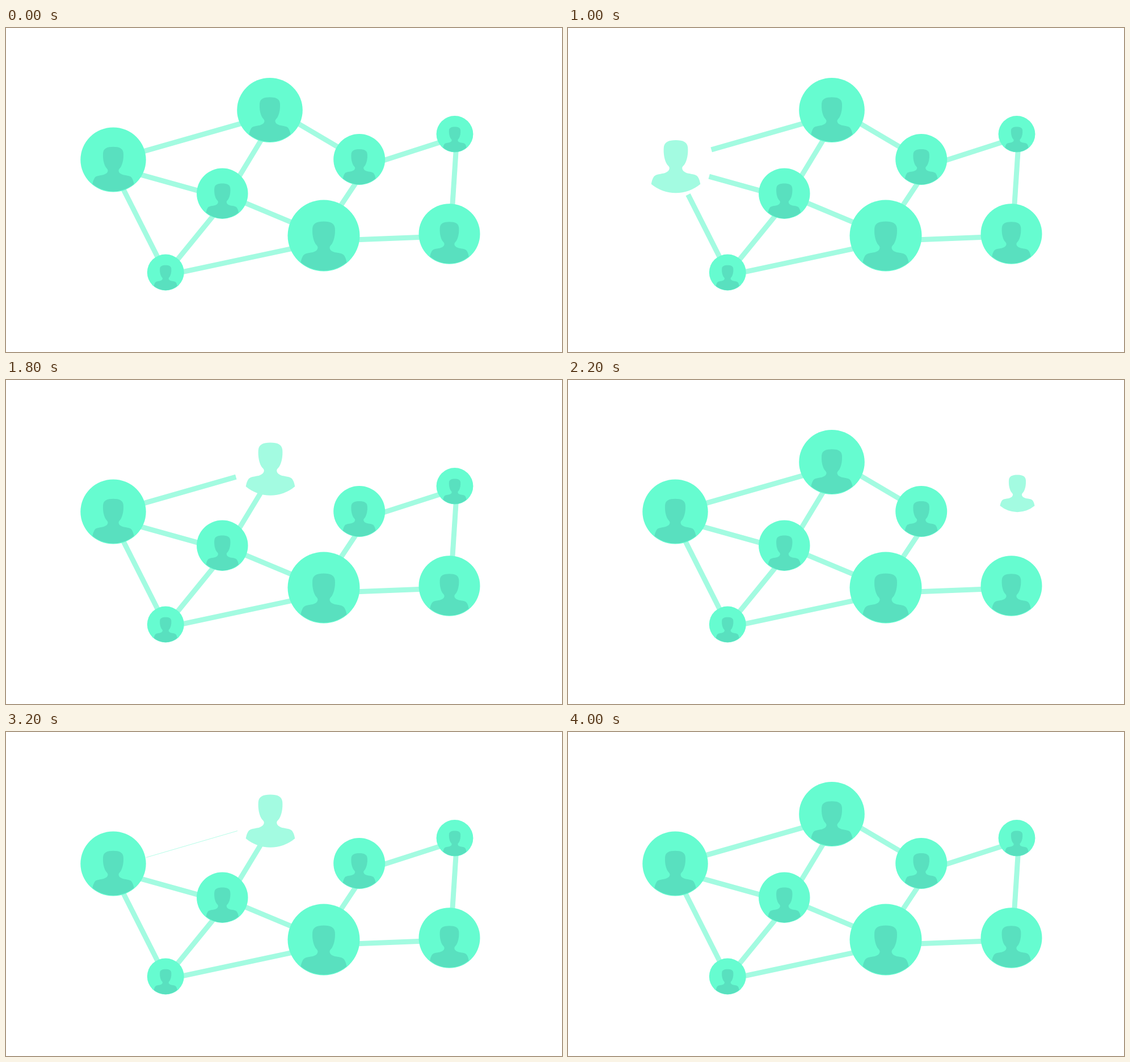
These frames come from a looping animation (980 by 572 pixels, 4100 ms). An HTML page with a canvas:

```html
<!DOCTYPE html>
<html lang="en">
<head>
<meta charset="utf-8">
<title>Network</title>
<style>
  html, body { margin: 0; width: 980px; height: 572px; overflow: hidden; background: #fff; }
  canvas { display: block; }
</style>
</head>
<body>
<canvas id="stage" width="980" height="572"></canvas>
<script>
const ctx = document.getElementById('stage').getContext('2d');
const DISC = '#66fcd0', BUST = '#59e0bf', PALE = '#a3fbe1';
const LOOP = 4100, STEP = 100, PAD = 5;

// Head is 100 units wide; the origin is the middle of its top edge.
const bust = new Path2D(
  'M0 0C30 0 47 8 49 30C51 55 46 82 36 98C30 106 26 108 26 114C26 124 34 131 48 135' +
  'C70 139 84 140 90 150C96 160 98 168 100 179A156 156 0 0 1 -100 179' +
  'C-98 168 -96 160 -90 150C-84 140 -70 139 -48 135C-34 131 -26 124 -26 114' +
  'C-26 108 -30 106 -36 98C-46 82 -51 55 -49 30C-47 8 -30 0 0 0Z');

// disc: x, y, rx, ry; pale: x, top, scale of the bare figure
const nodes = {
  A: { disc: [189, 232.5, 57.7, 57], pale: [190, 198, 0.433] },
  B: { disc: [465, 145, 57.8, 57], pale: [466, 110.5, 0.433] },
  C: { disc: [381.3, 292.3, 45.2, 44.7], pale: [383, 263, 0.365] },
  D: { disc: [281.3, 431.5, 32.5, 32], pale: [287, 405, 0.305] },
  E: { disc: [622.7, 232, 45.5, 45], pale: [629, 210, 0.365] },
  F: { disc: [560, 366.5, 63.5, 63], pale: [561, 339, 0.461] },
  G: { disc: [791, 187.2, 32.4, 32.2], pale: [792, 167.5, 0.305] },
  H: { disc: [781.5, 363.5, 54, 53.3], pale: [783.5, 338, 0.4] }
};

const links = {
  AB: [245, 217, 413, 169], AC: [241, 260, 338, 287], AD: [208, 287, 267, 404],
  BC: [449, 199, 411, 262], BE: [517, 170, 585, 210], CD: [364, 333, 303, 408],
  CF: [422, 309, 503, 343], DF: [314, 430, 502, 390], EG: [668, 233, 764, 202],
  EF: [615, 276, 591, 312], GH: [793, 219, 787, 311], FH: [623, 373.5, 729, 369.5]
};

// cut: link -> [start, end] trim in px, or 0 for a missing link
const looks = {
  A: { off: 'A', cut: { AB: [8, -PAD], AC: [8, -PAD], AD: [8, -PAD] } },
  A2: { off: 'A', cut: { AB: 0, AC: [8, -PAD], AD: [8, -PAD] } },
  B: { off: 'B', cut: { AB: [-PAD, 8], BE: 0 } },
  B2: { off: 'B', cut: { AB: 0, BE: 0 }, sliver: [247, 221.5, 408, 174.5] },
  C: { off: 'C', cut: { CD: 0, AC: [-PAD, 8], BC: [-PAD, 8], CF: [8, -PAD] } },
  D: { off: 'D', cut: { AD: 0, CD: 0, DF: [20, -PAD] }, sliver: [217, 292, 262, 384] },
  E: { off: 'E', cut: { EG: 0, EF: 0, BE: [-PAD, 8] } },
  G: { off: 'G', cut: { EG: 0, GH: 0 } },
  H: { off: 'H', cut: { GH: [-PAD, 9], FH: [-PAD, 8] } },
  FH: { off: 'FH', cut: { FH: 0, CF: [-PAD, 8.5], DF: [-PAD, 10], EF: [-PAD, 7], GH: [-PAD, 9] } },
  F: { off: 'F', cut: { FH: 0, CF: [-PAD, 8.5], DF: [-PAD, 10], EF: [-PAD, 7] } }
};
const whole = { off: '', cut: {} };

// step -> look; every other step shows the whole network
const plan = {
  1: 'G', 3: 'G', 4: 'H', 6: 'E', 8: 'F', 10: 'A', 12: 'A', 14: 'D', 16: 'A', 18: 'B',
  20: 'H', 22: 'G', 25: 'FH', 27: 'D', 29: 'A2', 31: 'C', 32: 'B2', 34: 'A', 36: 'G',
  38: 'G', 39: 'H'
};

function line(x1, y1, x2, y2, width, [start, end] = [0, 0]) {
  const len = Math.hypot(x2 - x1, y2 - y1);
  const ux = (x2 - x1) / len, uy = (y2 - y1) / len;
  ctx.lineWidth = width;
  ctx.beginPath();
  ctx.moveTo(x1 + ux * start, y1 + uy * start);
  ctx.lineTo(x2 - ux * end, y2 - uy * end);
  ctx.stroke();
}

function figure(x, top, scale, color) {
  ctx.save();
  ctx.translate(x, top);
  ctx.scale(scale, scale);
  ctx.fillStyle = color;
  ctx.fill(bust);
  ctx.restore();
}

function member({ disc: [x, y, rx, ry], pale }, off) {
  if (off) return figure(...pale, PALE);
  ctx.fillStyle = DISC;
  ctx.beginPath();
  ctx.ellipse(x, y, rx, ry, 0, 0, 2 * Math.PI);
  ctx.fill();
  const scale = ry / 156;
  figure(x, y + ry - 218 * scale, scale, BUST);
}

function draw({ off, cut, sliver }) {
  ctx.fillStyle = '#fff';
  ctx.fillRect(0, 0, 980, 572);
  ctx.strokeStyle = PALE;
  for (const id in links) {
    const trim = cut[id] ?? [-PAD, -PAD];
    if (trim) line(...links[id], 9, trim);
  }
  if (sliver) line(...sliver, 0.8);
  for (const id in nodes) member(nodes[id], off.includes(id));
}

function tick(now) {
  draw(looks[plan[Math.floor(now % LOOP / STEP)]] || whole);
  requestAnimationFrame(tick);
}
draw(whole);
requestAnimationFrame(tick);
</script>
</body>
</html>
```
